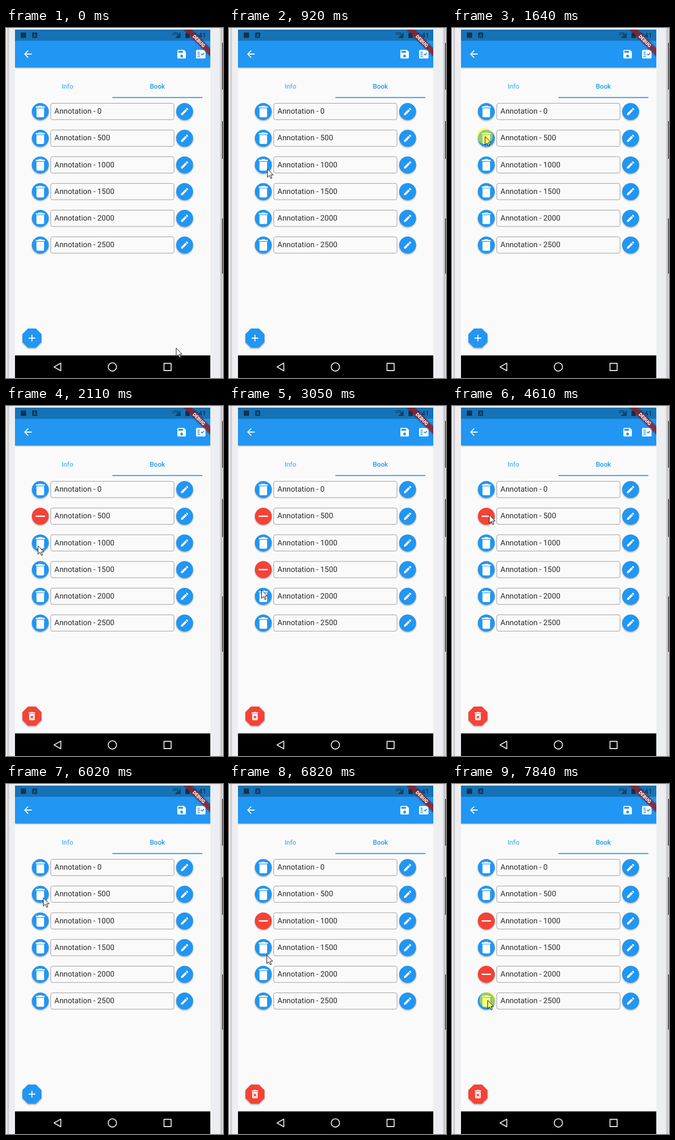
Animation, 410 px wide and 658 px high, one loop 8000 ms. Source, as an HTML page:

```html
<!DOCTYPE html>
<html lang="en">
<head>
<meta charset="utf-8">
<title>Annotations</title>
<style>
html, body { margin: 0; width: 100%; height: 100%; overflow: hidden; background: #eceef1; }
svg { display: block; width: 410px; height: 658px; font-family: Roboto, sans-serif; text-rendering: geometricPrecision; }
</style>
</head>
<body>
<svg id="stage" viewBox="0 0 410 658"></svg>
<script>
const BLUE = '#2196f3', RED = '#f44336', INK = '#0d3351', LOOP = 8000;

const ICONS = {
  back: 'M20 11H7.83l5.59-5.59L12 4l-8 8 8 8 1.41-1.41L7.83 13H20v-2z',
  save: 'M17 3H5c-1.11 0-2 .9-2 2v14c0 1.1.89 2 2 2h14c1.1 0 2-.9 2-2V7l-4-4zm-5 16c-1.66 0-3-1.34-3-3s1.34-3 3-3 3 1.34 3 3-1.34 3-3 3zm3-10H5V5h10v4z',
  check: 'M20 3H4c-1.1 0-2 .9-2 2v14c0 1.1.9 2 2 2h16c1.1 0 2-.9 2-2V5c0-1.1-.9-2-2-2zM10 17H5v-2h5v2zm0-4H5v-2h5v2zm0-4H5V7h5v2zm4.82 6L12 12.16l1.41-1.41 1.41 1.42L17.99 9l1.42 1.42L14.82 15z',
  trash: 'M6 19c0 1.1.9 2 2 2h8c1.1 0 2-.9 2-2V7H6v12zM19 4h-3.5l-1-1h-5l-1 1H5v2h14V4z',
  minus: 'M19 13H5v-2h14v2z',
  plus: 'M19 13h-6v6h-2v-6H5v-2h6V5h2v6h6v2z',
  edit: 'M3 17.25V21h3.75L17.81 9.94l-3.75-3.75L3 17.25zM20.71 7.04c.39-.39.39-1.02 0-1.41l-2.34-2.34c-.39-.39-1.02-.39-1.41 0l-1.83 1.83 3.75 3.75 1.83-1.83z',
  purge: 'M6 19c0 1.1.9 2 2 2h8c1.1 0 2-.9 2-2V7H6v12zm2.46-7.12l1.41-1.41L12 12.59l2.12-2.12 1.41 1.41L13.41 14l2.12 2.12-1.41 1.41L12 15.41l-2.12 2.12-1.41-1.41L10.59 14l-2.13-2.12zM15.5 4l-1-1h-5l-1 1H5v2h14V4z'
};

const icon = (name, x, y, scale = .893, attrs = '') =>
  `<path d="${ICONS[name]}" fill="#fff" fill-rule="evenodd" transform="translate(${x} ${y}) scale(${scale}) translate(-12 -12)" ${attrs}/>`;
const rect = (x, y, w, h, fill, attrs = '') =>
  `<rect x="${x}" y="${y}" width="${w}" height="${h}" fill="${fill}" ${attrs}/>`;
const disc = (x, y, attrs = '') =>
  `<circle cx="${x}" cy="${y + 1.8}" r="15.8" fill="#000" opacity=".34" filter="url(#soft)"/>
   <circle cx="${x}" cy="${y}" r="16" fill="${BLUE}" ${attrs}/>`;
const label = (x, y, size, text, attrs = '') =>
  `<text x="${x}" y="${y}" font-size="${size}" ${attrs}>${text}</text>`;

const bezel = () =>
  rect(0, 0, 410, 658, '#eceef1') +
  rect(0, 0, 3, 658, '#f1eff0') + rect(3, 0, 1.5, 658, '#b5adb1') + rect(4.5, 0, 2, 658, '#e2e0e3') +
  rect(404, 0, 2, 658, '#e0dee1') + rect(406, 0, 1.5, 658, '#b5adb1') + rect(407.5, 0, 2.5, 658, '#d8d6d8') +
  [[28, 88], [175, 71], [358, 104]].map(([y, h]) => rect(408.5, y, 1.5, h, '#302e31')).join('');

const statusBar = () =>
  rect(17, 3, 369, 21, '#1672b6') +
  rect(28, 8.5, 10, 10, INK) +
  rect(49.5, 8.5, 9.5, 10, INK, 'rx="1"') +
  label(54.2, 16.8, 9, 'A', 'fill="#1672b6" text-anchor="middle" font-weight="700"') +
  label(315, 12.5, 6.5, 'LTE', `fill="${INK}" font-weight="700"`) +
  `<path d="M319 19L330 8V19z" fill="${INK}" opacity=".75"/>
   <path d="M339 9.5h2.3v-1.3h3.4v1.3H347V19H339z" fill="${INK}"/>` +
  label(378, 17.7, 12.5, '8:41', `fill="${INK}" text-anchor="end" font-weight="500"`);

const appBar = () =>
  rect(17, 24, 369, 51.2, '#000', 'opacity=".3" filter="url(#soft)"') +
  rect(17, 24, 369, 50.4, BLUE) + statusBar() +
  icon('back', 41.3, 49) + icon('save', 331.8, 49.2) + icon('check', 368, 49.2);

const tabs = () =>
  label(116, 114, 12.5, 'Info', `fill="${BLUE}" opacity=".72" text-anchor="middle" font-weight="500"`) +
  label(286, 114, 12.5, 'Book', `fill="${BLUE}" text-anchor="middle" font-weight="500"`) +
  rect(201, 129.8, 170, 1.8, BLUE);

const rowY = i => 157 + i * 50.2;
const row = i => {
  const y = rowY(i);
  return disc(64.8, y, `id="disc${i}"`) +
    icon('trash', 64.8, y, 1.2, `id="trash${i}"`) + icon('minus', 64.8, y, 1.25, `id="minus${i}"`) +
    rect(84.5, y - 15.4, 233, 30.7, 'none', 'rx="3.6" stroke="#9b9b9b"') +
    label(91.6, y + 4.2, 14.3, 'Annotation - ' + i * 500, 'fill="#2a2a2a"') +
    disc(337.5, y) + icon('edit', 337.5, y, .75);
};

const octagon = 'M41.5 565h15L67 575.5v15L56.5 601h-15L31 590.5v-15z';
const actionButton = () =>
  `<path d="${octagon}" transform="translate(0 1.8)" opacity=".34" filter="url(#soft)"/>
   <path id="fab" d="${octagon}"/>` +
  icon('plus', 49, 583, .893, 'id="plus"') + icon('purge', 49, 583, .87, 'id="purge"');

const navBar = () => rect(17, 615.5, 369, 42.5, '#000') +
  `<g fill="none" stroke="#e6e6e6" stroke-width="1.8" stroke-linejoin="round">
   <path d="M90.7 637.2L103.5 630V644.4z"/><circle cx="201" cy="637.2" r="7.8"/>
   <rect x="298.5" y="630.5" width="13.5" height="13.5"/></g>`;

const banner = () => `<g clip-path="url(#screen)"><g transform="translate(386 3) rotate(45)">` +
  rect(-36, 25, 72, 10.7, '#000', 'opacity=".4" filter="url(#soft)"') +
  rect(-36, 25, 72, 10.7, '#b71c1c', 'opacity=".63"') +
  label(0, 33.5, 9.1, 'DEBUG', 'fill="#fff" text-anchor="middle" font-weight="900"') + '</g></g>';

document.getElementById('stage').innerHTML = `<defs>
  <filter id="soft" x="-30%" y="-30%" width="160%" height="160%"><feGaussianBlur stdDeviation="1.6"/></filter>
  <clipPath id="screen">${rect(17, 3, 369, 613, '#000')}</clipPath></defs>` +
  bezel() + rect(17, 3, 369, 613, '#fafafa') +
  `<g clip-path="url(#screen)">${appBar()}</g>` + tabs() +
  [0, 1, 2, 3, 4, 5].map(row).join('') + actionButton() + navBar() + banner() +
  `<g id="pointer"><circle id="halo" r="15" fill="#ff0" fill-opacity=".5"/>
   <path id="arrow" d="M.5 .8V16.6L4.2 13.1L6.9 18.9L9.1 18L6.7 12.2H11.6z" stroke="#111" stroke-width="1"/></g>`;

// Pointer moves: start, time of last step, number of steps, destination
const START = [321, 601];
const MOVES = [
  [70, 530, 7, 72, 266], [920, 920, 1, 72, 264], [1000, 1560, 8, 62, 203],
  [1880, 2110, 4, 60, 262], [2190, 2590, 6, 60, 315], [2900, 3050, 3, 61, 345],
  [3130, 3450, 5, 66, 316], [3610, 3610, 1, 66, 314], [3760, 3760, 1, 66, 313],
  [3920, 3920, 1, 66, 309], [4240, 4610, 5, 70, 204], [6020, 6020, 1, 70, 213],
  [6100, 6180, 2, 70, 260], [6660, 6980, 5, 72, 354], [7520, 7760, 4, 67, 406]
];
const CLICKS = [[1640, 1800], [2670, 2820], [4000, 4160], [4920, 5080], [6420, 6580], [7290, 7440], [7840, LOOP]];
// Selected rows: row, from, until
const MARKED = [[1, 1800, 5080], [3, 2820, 4160], [2, 6580, LOOP], [4, 7440, LOOP]];

const ease = p => p * p * (3 - 2 * p);
const within = (t, from, until) => t >= from && t < until;

function pointerAt(t) {
  let [x, y] = START;
  for (const [start, end, steps, toX, toY] of MOVES) {
    if (t < start) break;
    const done = t >= end ? steps : Math.floor((t - start) / (end - start) * (steps - 1)) + 1;
    const p = ease(done / steps);
    x += (toX - x) * p;
    y += (toY - y) * p;
  }
  return [Math.round(x), Math.round(y)];
}

const el = id => document.getElementById(id);
const show = (id, on) => el(id).setAttribute('visibility', on ? 'visible' : 'hidden');
const paint = (id, color) => el(id).setAttribute('fill', color);

function draw(t) {
  const marked = MARKED.filter(([, from, until]) => within(t, from, until)).map(([i]) => i);
  for (let i = 0; i < 6; i++) {
    const on = marked.includes(i);
    paint('disc' + i, on ? RED : BLUE);
    show('trash' + i, !on);
    show('minus' + i, on);
  }
  const any = marked.length > 0;
  paint('fab', any ? RED : BLUE);
  show('plus', !any);
  show('purge', any);

  const pressed = CLICKS.some(([from, until]) => within(t, from, until));
  show('halo', pressed);
  paint('arrow', pressed ? '#ffff70' : '#fff');
  el('pointer').setAttribute('transform', `translate(${pointerAt(t)})`);
}

const began = performance.now();
function tick() {
  draw((performance.now() - began) % LOOP);
  requestAnimationFrame(tick);
}
tick();
</script>
</body>
</html>
```
